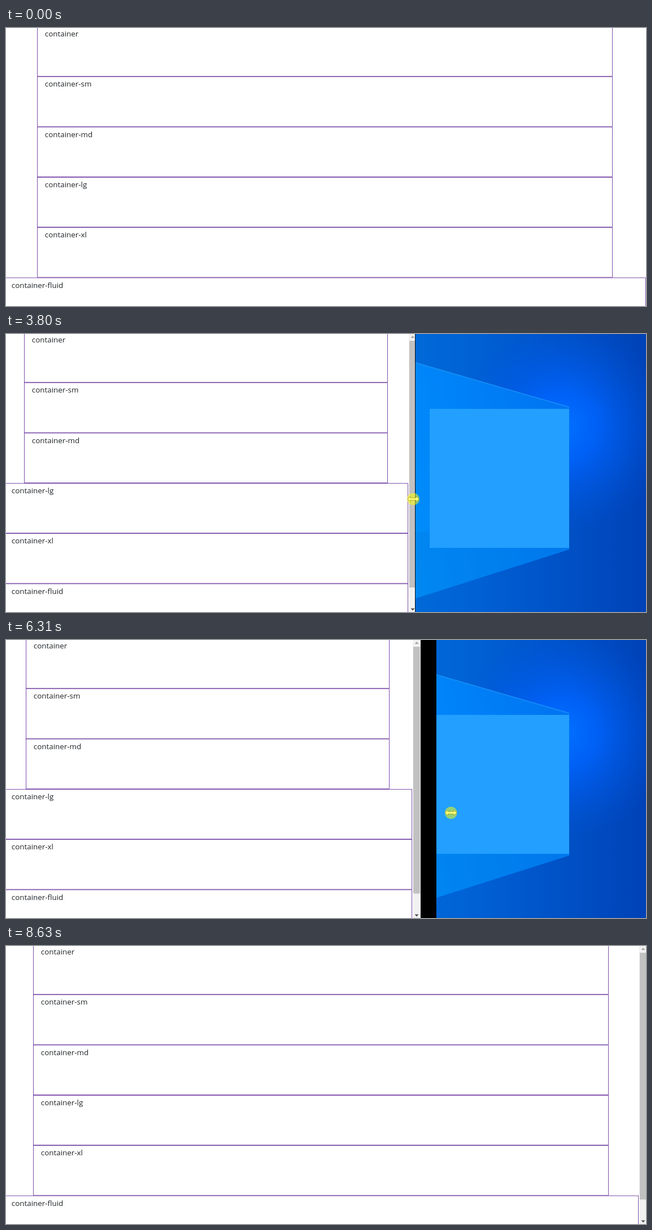
An HTML page with a canvas for the animation above (9110 ms loop, 1133 px wide and 494 px high).

```html
<!DOCTYPE html>
<html lang="en">
<head>
<meta charset="utf-8">
<title>Responsive containers</title>
<style>
  html, body { margin: 0; width: 100%; height: 100%; overflow: hidden; background: #fff; }
  canvas { display: block; width: 100%; height: 100%; }
</style>
</head>
<body>
<canvas id="stage" width="1133" height="494"></canvas>
<script>
const WIDTH = 1133, HEIGHT = 494, LOOP = 9110;
const PAGE_LEFT = -4, SCALE = 0.894, SCROLLBAR = 14;
const START_X = 1142, DRAG_START = 2590, DRAG_END = 8160;
const EDGE_LAG = 60, LAYOUT_LAG = 120;
const ctx = document.getElementById('stage').getContext('2d');

// Strokes of the drag: the pointer eases to x between two times.
const drags = [
  { from: 2590, until: 3500, x: 826, power: 1.37 },
  { from: 3500, until: 3680, x: 721, power: 1 },
  { from: 3840, until: 4600, x: 602, power: 1 },
  { from: 5110, until: 5350, x: 444, power: 1 },
  { from: 5620, until: 6770, x: 1016, power: 1 },
  { from: 6770, until: 7600, x: 1129, power: 1.2 },
];
const labels = ['', '-sm', '-md', '-lg', '-xl', '-fluid'].map(suffix => 'container' + suffix);
const fluidBelow = [576, 576, 768, 992, 1200, Infinity];
const containerWidth = { 1200: 1140, 992: 960, 768: 720, 576: 540 };

const mix = (a, b, k) => a + (b - a) * k;
const progress = (time, from, until) => Math.min(1, Math.max(0, (time - from) / (until - from)));
const easeOut = (k, power) => 1 - (1 - k) ** power;

function dragX(time) {
  return drags.reduce((x, d) =>
    mix(x, d.x, easeOut(progress(time, d.from, d.until), d.power)), START_X);
}

function pointerAt(time) {
  if (time < 330) return null;
  if (time < 800) return [mix(993, 1150, progress(time, 330, 600)), 492];
  if (time < DRAG_START) {
    const k = progress(time, 800, 1640);
    return [START_X - 844 * Math.sin(Math.PI * k), mix(473, 262, k)];
  }
  if (time < DRAG_END) {
    return [dragX(time), mix(262, 307, easeOut(progress(time, DRAG_START, 6300), 3))];
  }
  const k = progress(time, DRAG_END, 8620);
  return [mix(1129, 785, k), mix(307, 515, k)];
}

function rect(color, x, y, w, h) {
  ctx.fillStyle = color;
  ctx.fillRect(x, y, w, h);
}

function polygon(points) {
  ctx.beginPath();
  points.forEach(([x, y]) => ctx.lineTo(x, y));
  ctx.closePath();
}

function fillPolygon(color, points) {
  polygon(points);
  ctx.fillStyle = color;
  ctx.fill();
}

function gradient(shape, stops) {
  stops.forEach(([at, color]) => shape.addColorStop(at, color));
  return shape;
}

const skyFill = gradient(ctx.createLinearGradient(430, 0, WIDTH, 0),
  [[0, '#0080dc'], [0.55, '#0062d6'], [1, '#0042b7']]);
const beamFill = gradient(ctx.createLinearGradient(430, 330, 997, 200),
  [[0, '#00a6f7'], [0.55, '#0089fa'], [1, '#0074f2']]);
const glowFill = gradient(ctx.createRadialGradient(985, 165, 5, 985, 165, 190),
  [[0, '#0070ff'], [0.3, 'rgba(0,100,255,.85)'], [1, 'rgba(0,85,225,0)']]);

function drawDesktop() {
  rect(skyFill, 0, 0, WIDTH, HEIGHT);
  rect(glowFill, 790, 0, 343, 360);
  fillPolygon(beamFill, [[997, 130], [430, -35], [430, 564], [997, 383]]);
  fillPolygon('rgba(0,120,215,.28)', [[750, 350], [430, 390], [430, 564], [997, 383]]);
  ctx.strokeStyle = 'rgba(40,165,255,.6)';
  ctx.lineWidth = 1.5;
  ctx.beginPath();
  ctx.moveTo(430, -35);
  ctx.lineTo(997, 130);
  ctx.stroke();
  rect('#229fff', 750, 133, 247, 247);
}

function drawPage(right) {
  const viewport = (right - PAGE_LEFT + SCROLLBAR) / SCALE;
  const breakpoint = [1200, 992, 768, 576].find(min => viewport >= min);
  const fixedWidth = breakpoint ? containerWidth[breakpoint] * SCALE : 0;
  ctx.font = '13.4px "Open Sans", "Noto Sans", sans-serif';
  ctx.lineWidth = 0.8;
  ctx.strokeStyle = breakpoint ? '#5c2494' : '#f3151c';
  ctx.fillStyle = '#212529';
  labels.forEach((label, i) => {
    const fluid = viewport < fluidBelow[i];
    const left = fluid ? PAGE_LEFT : Math.floor((PAGE_LEFT + right - fixedWidth) / 2 + 0.1);
    const width = fluid ? right - PAGE_LEFT : Math.round(fixedWidth);
    const top = 89.3 * i - 3;
    ctx.strokeRect(left + 0.5, top + 0.4, width - 1, 88.5);
    ctx.fillText(label, left + 13.8, Math.round(top + 18));
  });
}

function drawScrollbar(x, hovered) {
  rect('#f1f1f1', x, 0, SCROLLBAR, HEIGHT);
  rect(hovered ? '#a8a8a8' : '#c1c1c1', x + 1, 12, 12, 438.5);
  fillPolygon('#a3a3a3', [[x + 3.5, 7], [x + 7, 3], [x + 10.5, 7]]);
  fillPolygon('#505050', [[x + 3.5, 487.5], [x + 7, 491.5], [x + 10.5, 487.5]]);
}

const resizeShape = [[-10.5, 0], [-5, -5], [-5, -2], [5, -2], [5, -5],
  [10.5, 0], [5, 5], [5, 2], [-5, 2], [-5, 5]];
const arrowShape = [[0, 0], [0, 14], [3.3, 11], [5.6, 16], [7.6, 15], [5.4, 10.2], [10, 10]];

function drawPointer([x, y], resizing) {
  ctx.save();
  ctx.translate(x, y);
  polygon(resizing ? resizeShape : arrowShape);
  ctx.fillStyle = '#fff';
  ctx.fill();
  ctx.strokeStyle = '#333';
  ctx.lineWidth = 0.8;
  ctx.stroke();
  ctx.beginPath();
  ctx.arc(0, 0, 10.8, 0, 2 * Math.PI);
  ctx.fillStyle = 'rgba(255,255,0,.52)';
  ctx.fill();
  ctx.restore();
}

function draw(time) {
  // The window frame trails the pointer, and the page layout trails the frame.
  const edge = Math.round(dragX(time - EDGE_LAG) + 4);
  const right = Math.round(dragX(time - LAYOUT_LAG) - 9);
  const pointer = pointerAt(time);
  const hovered = time > DRAG_END && pointer[0] > right;

  drawDesktop();
  rect('#000', 0, 0, edge, HEIGHT);
  ctx.save();
  ctx.beginPath();
  ctx.rect(0, 0, edge, HEIGHT);
  ctx.clip();
  rect('#fff', 0, 0, right + 1, HEIGHT);
  drawPage(right);
  drawScrollbar(right + 1, hovered);
  if (edge < WIDTH) rect('#012', edge - 1, 0, 1, HEIGHT);
  ctx.restore();
  if (pointer) drawPointer(pointer, time >= DRAG_START && time < DRAG_END);
}

const start = performance.now();
function tick() {
  draw((performance.now() - start) % LOOP);
  requestAnimationFrame(tick);
}
tick();
</script>
</body>
</html>
```
